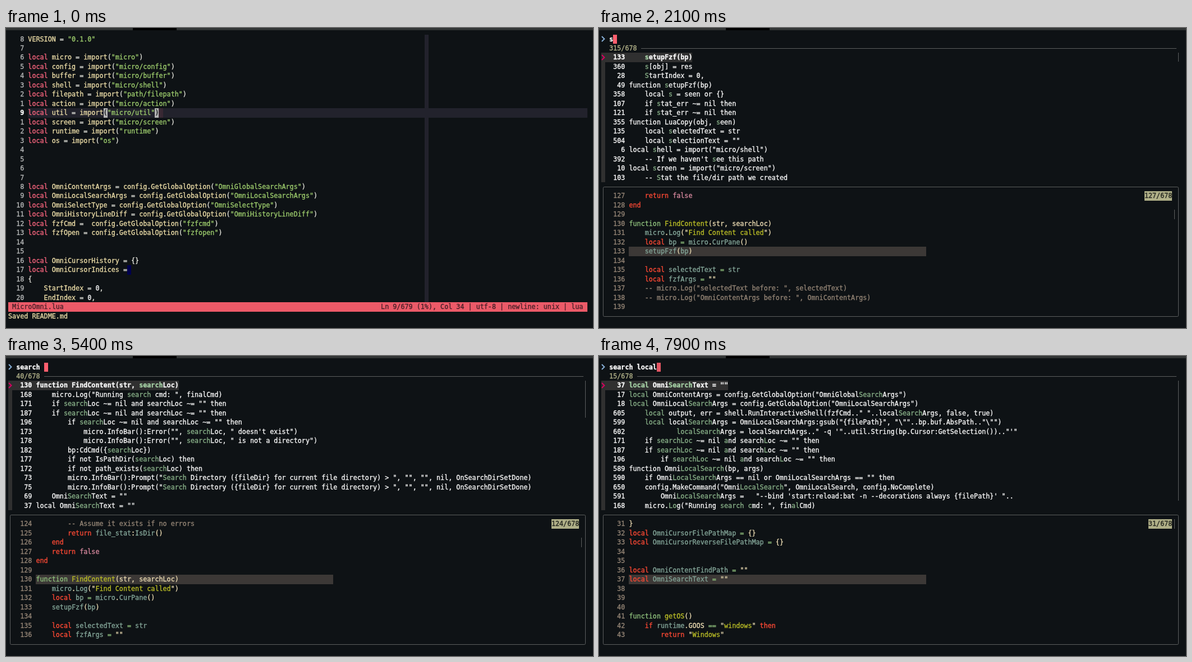
Write an HTML page with a canvas that moves like this. It is 1046 px wide and 535 px high and loops after 8 s.

```html
<!DOCTYPE html>
<html lang="en">
<head>
<meta charset="utf-8">
<title>Editor search</title>
<style>
html, body { margin: 0; width: 100%; height: 100%; overflow: hidden; background: #0e1215; }
canvas { display: block; }
</style>
</head>
<body>
<canvas id="stage" width="1046" height="535"></canvas>
<script>
const ctx = document.getElementById('stage').getContext('2d');
const LOOP = 8000, CW = 7.065, CH = 16.47, LEFT = 4, TOP = 11.5;
const BG = '#0e1215', BAND = '#22222c', LINE = '#5c5e5e', PINK = [255, 95, 110];
const FONT = '11.735px "DejaVu Sans Mono", monospace';

const split = s => s.slice(1).split('\n');

// Known lines of the edited file, by line number
const file = [];
const addLines = (from, text) => split(text).forEach((s, i) => file[from + i] = s);
addLines(1, String.raw`
VERSION = "0.1.0"

local micro = import("micro")
local config = import("micro/config")
local buffer = import("micro/buffer")
local shell = import("micro/shell")
local filepath = import("path/filepath")
local action = import("micro/action")
local util = import("micro/util")
local screen = import("micro/screen")
local runtime = import("runtime")
local os = import("os")




local OmniContentArgs = config.GetGlobalOption("OmniGlobalSearchArgs")
local OmniLocalSearchArgs = config.GetGlobalOption("OmniLocalSearchArgs")
local OmniSelectType = config.GetGlobalOption("OmniSelectType")
local OmniHistoryLineDiff = config.GetGlobalOption("OmniHistoryLineDiff")
local fzfCmd =  config.GetGlobalOption("fzfcmd")
local fzfOpen = config.GetGlobalOption("fzfopen")


local OmniCursorHistory = {}
local OmniCursorIndices =
{
    StartIndex = 0,
    EndIndex = 0,

}
local OmniCursorFilePathMap = {}
local OmniCursorReverseFilePathMap = {}


local OmniContentFindPath = ""
local OmniSearchText = ""



function getOS()
    if runtime.GOOS == "windows" then
        return "Windows"`);
addLines(124, String.raw`
        -- Assume it exists if no errors
        return file_stat:IsDir()
    end
    return false
end

function FindContent(str, searchLoc)
    micro.Log("Find Content called")
    local bp = micro.CurPane()
    setupFzf(bp)

    local selectedText = str
    local fzfArgs = ""
    -- micro.Log("selectedText before: ", selectedText)
    -- micro.Log("OmniContentArgs before: ", OmniContentArgs)
`);
addLines(162, String.raw`
    if currentOS == "Unix" then
        finalCmd = "sh -c \'"..finalCmd.."\'"
    else
        finalCmd = "cmd /s /v /c "..finalCmd..""
    end

    micro.Log("Running search cmd: ", finalCmd)

    local currentLoc = os.Getwd()
    if searchLoc ~= nil and searchLoc ~= "" then
        if not path_exists(searchLoc) then
            micro.InfoBar():Error("", searchLoc, " doesn't exist")
            return`);

// Result lists; ^ switches match colouring on and off
const files = split(`
repo.json
LICENSE
README.md
log.txt
MicroOmni.lua
Resources/GlobalSearch.gif`);
const allList = file.slice(1, 15).map((s, i) => `${i + 1} ${s}`);
const sList = split(String.raw`
133     ^s^etupFzf(bp)
360     ^s^[obj] = res
28     ^S^tartIndex = 0,
49 function ^s^etupFzf(bp)
358     local ^s^ = seen or {}
107     if ^s^tat_err ~= nil then
121     if ^s^tat_err ~= nil then
355 function LuaCopy(obj, ^s^een)
135     local ^s^electedText = str
504     local ^s^electionText = ""
6 local ^s^hell = import("micro/shell")
392     -- If we haven't ^s^ee this path
10 local ^s^creen = import("micro/screen")
103     -- ^S^tat the file/dir path we created`);
const searchList = split(String.raw`
130 function FindContent(str, ^search^Loc)
168     micro.Log("Running ^search^ cmd: ", finalCmd)
171     if ^search^Loc ~= nil and searchLoc ~= "" then
187     if ^search^Loc ~= nil and searchLoc ~= "" then
196         if ^search^Loc ~= nil and searchLoc ~= "" then
173             micro.InfoBar():Error("", ^search^Loc, " doesn't exist")
178             micro.InfoBar():Error("", ^search^Loc, " is not a directory")
182         bp:CdCmd({^search^Loc})
177         if not IsPathDir(^search^Loc) then
172         if not path_exists(^search^Loc) then
73         micro.InfoBar():Prompt("^Search^ Directory ({fileDir} for current file directory) > ", "", "", nil, OnSearchDirSetDone)
75         micro.InfoBar():Prompt("^Search^ Directory ({fileDir} for current file directory) > ", "", "", nil, OnSearchDirSetDone)
69     Omni^Search^Text = ""
37 local Omni^Search^Text = ""`);
const loList = split(String.raw`
168     micro.^Lo^g("Running ^search^ cmd: ", finalCmd)
130 function FindContent(str, ^searchLo^c)
171     if ^searchLo^c ~= nil and searchLoc ~= "" then
187     if ^searchLo^c ~= nil and searchLoc ~= "" then
196         if ^searchLo^c ~= nil and searchLoc ~= "" then
173             micro.InfoBar():Error("", ^searchLo^c, " doesn't exist")
178             micro.InfoBar():Error("", ^searchLo^c, " is not a directory")
37 ^lo^cal Omni^Search^Text = ""
17 ^lo^cal OmniContentArgs = config.GetGlobalOption("OmniGlobal^Search^Args")
18 ^lo^cal OmniLocal^Search^Args = config.GetGlobalOption("OmniLocalSearchArgs")
605     ^lo^cal output, err = shell.RunInteractiveShell(fzfCmd.." "..local^Search^Args, false, true)
599     ^lo^cal local^Search^Args = OmniLocalSearchArgs:gsub("{filePath}", "\""..bp.buf.AbsPath.."\"")
602             ^lo^cal^Search^Args = localSearchArgs.." -q '"..util.String(bp.Cursor:GetSelection()).."'"
182         bp:CdCmd({^searchLo^c})`);
const locList = loList.slice(1).map(s => s.replace('Lo^c', 'Loc^').replace('^lo^c', '^loc^'));
const localList = [
  ...loList.slice(7, 13).map(s => s.replace('^lo^cal', '^local^').replace('^^', '')),
  ...split(String.raw`
171     if ^searchLoc^ ~= nil ^a^nd search^L^oc ~= "" then
187     if ^searchLoc^ ~= nil ^a^nd search^L^oc ~= "" then
196         if ^searchLoc^ ~= nil ^a^nd search^L^oc ~= "" then
589 function Omni^LocalSearch^(bp, args)
590     if Omni^LocalSearch^Args == nil or OmniLocalSearchArgs == "" then
650     config.MakeCommand("Omni^LocalSearch^", OmniLocalSearch, config.NoComplete)
591         Omni^LocalSearch^Args =   "--bind 'start:reload:bat -n --decorations always {filePath}' "..
168     micro.^Lo^g("Running ^search^ ^c^md: ", fin^al^Cmd)`)];

// time, query, match count, list
const states = [
  [1600, '', 6, files],
  [1700, '', 678, allList],
  [2100, 's', 315, sList],
  [2300, 'se', 190, sList],
  [2500, 'sea', 52, searchList],
  [2600, 'sear', 43, searchList],
  [2700, 'searc', 41, searchList],
  [2900, 'search', 40, searchList],
  [4400, 'search ', 40, searchList],
  [5500, 'search l', 34, loList],
  [6000, 'search lo', 26, loList],
  [6400, 'search loc', 24, locList],
  [6700, 'search loca', 15, localList],
  [6960, 'search local', 15, localList]
];

const editorTheme = { kw: '#f5647d', fn: '#eadba6', str: '#9ccb6c', quote: '#9ccb6c', esc: '#9ccb6c',
  id: '#eadba6', op: '#e4e4dc', num: '#f4f4f4', punct: '#e4e4dc', lit: '#f4f4f4' };
const previewTheme = { kw: '#fb4934', fn: '#8ec07c', name: '#b8bb26', str: '#b8bb26', quote: '#ebdbb2', esc: '#fb4934',
  id: '#83a598', op: '#8ec07c', num: '#d3869b', punct: '#ebdbb2', lit: '#d3869b', note: '#928374' };

const colX = c => LEFT + c * CW, rowY = r => TOP + r * CH;

function fill(x, y, w, h, color) {
  ctx.fillStyle = color;
  ctx.fillRect(x, y, w, h);
}

function cells(col, row, n, color, rows = 1) {
  const x = Math.round(colX(col)), y = Math.round(rowY(row));
  fill(x, y, Math.round(colX(col + n)) - x, Math.round(rowY(row + rows)) - y, color);
}

// A thin outline gives the letters their sturdy terminal weight
function print(col, row, text, color, bold) {
  ctx.font = (bold ? 'bold ' : '') + FONT;
  ctx.fillStyle = ctx.strokeStyle = color;
  ctx.lineWidth = 0.35;
  const y = Math.round(rowY(row) + 12);
  [...text].forEach((c, i) => {
    if (c === ' ') return;
    ctx.fillText(c, colX(col + i), y);
    ctx.strokeText(c, colX(col + i), y);
  });
}

function chevron(row, color) {
  const y = rowY(row) + 8;
  ctx.strokeStyle = color;
  ctx.lineWidth = 2;
  ctx.beginPath();
  ctx.moveTo(5, y - 4.5);
  ctx.lineTo(9.5, y);
  ctx.lineTo(5, y + 4.5);
  ctx.stroke();
}

function printString(col, row, tok, theme) {
  print(col, row, '"', theme.quote);
  print(col + tok.length - 1, row, '"', theme.quote);
  for (const { 0: part, index } of tok.slice(1, -1).matchAll(/\\.|[^\\]+/g))
    print(col + 1 + index, row, part, part[0] === '\\' ? theme.esc : theme.str);
}

function printCode(col, row, text, theme) {
  const isDef = text.startsWith('function');
  let named = false;
  for (const { 0: tok, index } of text.matchAll(/--.*|"(?:\\.|[^"\\])*"|\w+|\.\.|\S/g)) {
    const at = col + index;
    if (tok[0] === '"') {
      printString(at, row, tok, theme);
      continue;
    }
    let kind = 'punct';
    if (/^--/.test(tok)) kind = 'note';
    else if (/^(local|if|then|else|end|return)$/.test(tok)) kind = 'kw';
    else if (/^(function|and|or|not)$/.test(tok)) kind = 'fn';
    else if (/^(true|false|nil)$/.test(tok) || tok === 'os' && text.includes('os.')) kind = 'lit';
    else if (/^\d/.test(tok)) kind = 'num';
    else if (/^\w/.test(tok)) {
      kind = isDef ? (named ? 'punct' : 'name') : tok === 'GOOS' ? 'punct' : 'id';
      named = true;
    } else if (/^(\.\.|[=~])/.test(tok)) kind = 'op';
    print(at, row, tok, theme[kind]);
  }
}

function cursor(col, row, level, under) {
  const mix = PINK.map((v, i) => Math.round(under[i] + (v - under[i]) * level));
  cells(col, row, 1, `rgb(${mix})`);
}

function drawEditor(level) {
  cells(5, 8, 141.1, BAND);
  cells(105, 0, 1, BAND, 29);
  for (let n = 1; n < 30; n++) {
    const here = n === 9, label = String(here ? 9 : Math.abs(n - 9));
    print(4 - label.length, n - 1, label, here ? '#ffffff' : '#b4b6b6', here);
    printCode(5, n - 1, file[n], editorTheme);
  }
  for (const [col, c] of [[24, '('], [37, ')']]) {
    cells(col, 8, 1, '#b4b4b4');
    print(col, 8, c, '#16191c');
  }
  cells(30, 25, 1, '#00004e');
  cursor(38, 8, level, [34, 34, 44]);
  cells(0, 29, 146.1, '#ec5a68');
  print(1, 29, 'MicroOmni.lua', '#4a2028');
  const info = 'Ln 9/679 (1%), Col 34 | utf-8 | newline: unix | lua';
  print(145 - info.length, 29, info, '#4a2028');
  print(0, 30, 'Saved README.md', '#eadba6');
}

function drawList(list, count, isFiles) {
  cells(0, 2, 1, '#303030', list.length);
  list.forEach((item, i) => {
    const now = i === 0, row = 2 + i;
    const text = isFiles ? item : item.replace(/^\d+/, n => n.padStart(3));
    let col = isFiles ? 2 : 3;
    if (now) cells(0, row, col + text.replaceAll('^', '').length, '#303030');
    text.split('^').forEach((part, k) => {
      print(col, row, part, k % 2 ? (now ? '#a5d0a5' : '#87af87') : '#f8f8f8', now);
      col += part.length;
    });
  });
  chevron(2, '#d7005f');
  if (!isFiles) {
    const rows = Math.max(1, Math.floor(196 / count));
    fill(1032, 44, 1, Math.round(rows * CH), LINE);
  }
}

function drawPreview(line) {
  const first = Math.max(1, line - 6);
  for (let i = 0; i < 13; i++) {
    const n = first + i, row = 17 + i;
    if (n === line) cells(7, row, 75, '#3c3836');
    print(3, row, String(n).padStart(3), '#928374');
    printCode(7, row, file[n] || '', previewTheme);
  }
  const label = first + '/678';
  cells(144 - label.length, 17, label.length, '#afaf87');
  print(144 - label.length, 17, label, '#24261f');
  fill(1025, Math.round(rowY(17 + Math.floor(first / 665 * 12))), 1, 17, LINE);
}

function drawFinder([, query, count, list], level) {
  const isFiles = list === files, info = `${count}/${isFiles ? 6 : 678}`;
  chevron(0, '#87afd7');
  print(2, 0, query, '#f8f8f8', true);
  cursor(2 + query.length, 0, level, [14, 18, 21]);
  if (isFiles) for (const y of [30, 34, 38]) fill(8, y, 2, 2, '#afaf5f');
  print(2, 1, info, '#afaf87');
  const x = Math.round(colX(3 + info.length));
  fill(x, 36, 1029 - x, 1, LINE);
  drawList(list, count, isFiles);
  ctx.strokeStyle = LINE;
  ctx.lineWidth = 1;
  ctx.beginPath();
  ctx.roundRect(7.5, 283.5, 1025, 231, 2);
  ctx.stroke();
  if (isFiles) {
    print(2, 17, '[bat error]', '#f0403c');
    print(13, 17, ': invalid digit found in string', '#f8f8f8');
  } else drawPreview(parseInt(list[0]));
}

function draw() {
  const t = Math.floor(performance.now() % LOOP / 100) * 100;
  const state = states.findLast(s => s[0] <= t);
  const phase = (t - (state ? state[0] : -550)) / 1000 % 1;
  const level = Math.abs(1 - 2 * phase);
  fill(0, 0, 1046, 535, BG);
  fill(0, 0, 1046, 4, '#313434');
  fill(226, 0, 78, 4, '#000000');
  if (state) drawFinder(state, level);
  else drawEditor(level);
  requestAnimationFrame(draw);
}
draw();
</script>
</body>
</html>
```
